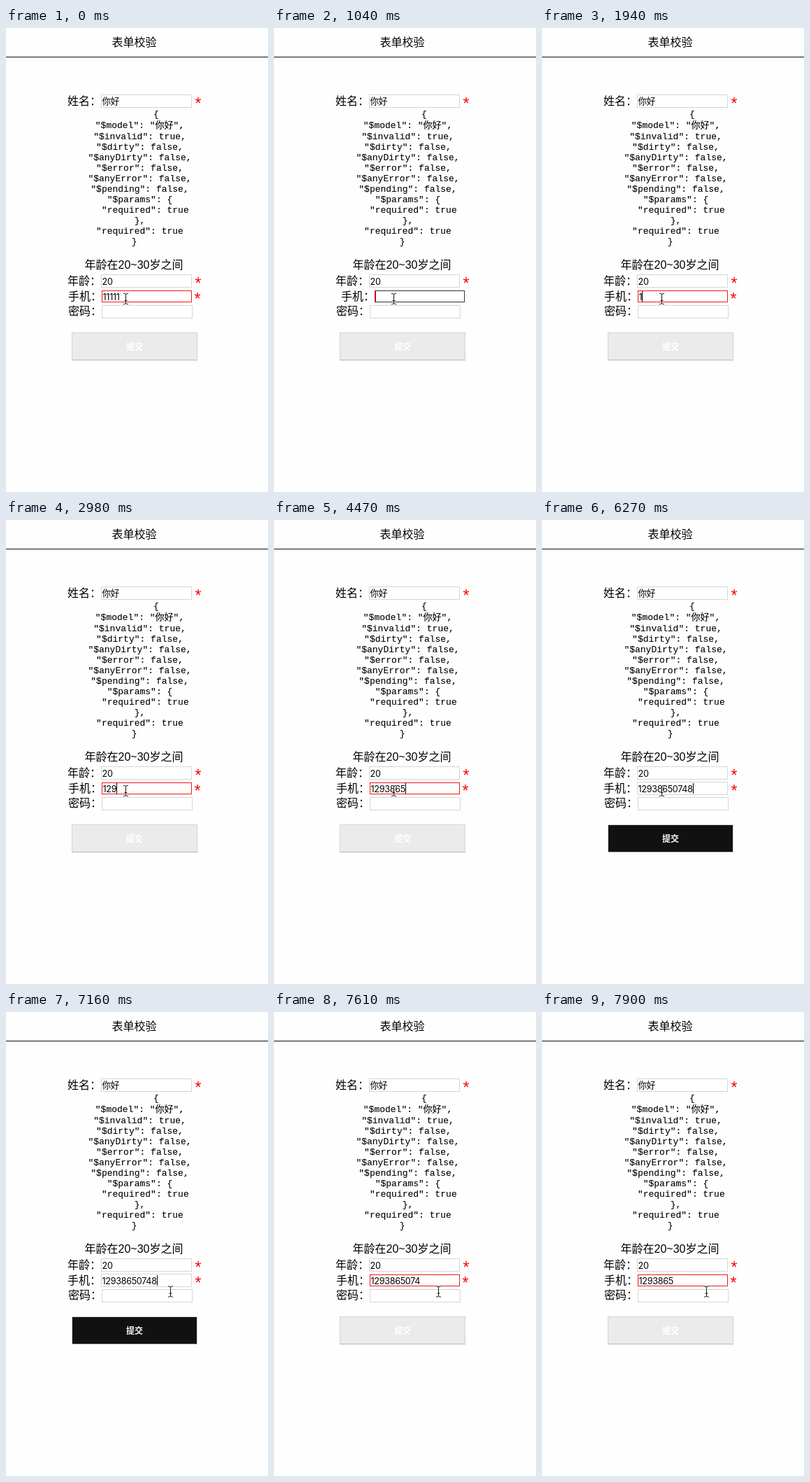
An HTML page for the animation above (8000 ms loop, 375 px wide and 663 px high).

```html
<!DOCTYPE html>
<html lang="zh-CN">
<head>
<meta charset="utf-8">
<title>表单校验</title>
<style>
  html, body { margin: 0; width: 100%; height: 100%; overflow: hidden; background: #fefefe; }
  svg { display: block; width: 375px; height: 663px; }
  text { font: 16px "Liberation Sans", "Noto Sans CJK SC", "Noto Sans CJK", sans-serif; white-space: pre; }
  .value { font: 12.6px Inter, "Noto Sans CJK SC", "Noto Sans CJK", sans-serif; letter-spacing: -.3px; }
  .code { font: 13px "Liberation Mono", "Noto Sans CJK SC", "Noto Sans CJK", monospace; text-anchor: middle; stroke: #000; stroke-width: .1px; }
  .star { font: 23px "Liberation Sans", sans-serif; fill: #f00; text-anchor: middle; }
  .submit { font: bold 12px "Noto Sans CJK SC", "Noto Sans CJK", sans-serif; fill: #fff; text-anchor: middle; }
  .field { fill: #fff; stroke: #d6d6d6; }
</style>
</head>
<body>
<svg viewBox="0 0 375 663">
  <rect width="375" height="663" fill="#fefefe"/>
  <text x="151.5" y="26">表单校验</text>
  <rect y="41" width="375" height="1" fill="#111"/>

  <g transform="translate(88 95)">
    <text y="14.5">姓名：</text>
    <rect class="field" x="48.5" y=".5" width="129" height="18"/>
    <text class="value" x="49.5" y="14">你好</text>
    <text class="star" x="187" y="20.5">*</text>
  </g>

  <g id="model"></g>

  <text x="112.5" y="344">年龄在20~30岁之间</text>
  <g transform="translate(88 352)">
    <text y="14.5">年龄：</text>
    <rect class="field" x="48.5" y=".5" width="129" height="18"/>
    <text class="value" x="49.5" y="14.5">20</text>
    <text class="star" x="187" y="20.5">*</text>
  </g>

  <g id="row">
    <text y="14.5">手机：</text>
    <rect id="plain" class="field" x="48.5" y=".5" width="129" height="18"/>
    <rect id="framed" x="48.5" y="1.5" width="128" height="16" fill="#fff"/>
    <path id="edge" d="M48.5 1V18" stroke="#e00"/>
    <rect id="mark" x="50" y="2" width="28" height="15" fill="#b4d5fe"/>
    <text id="phone" class="value" x="49.5" y="14.5"></text>
    <rect id="caret" y="2" width="1" height="15"/>
    <text id="star" class="star" x="186" y="20.5">*</text>
  </g>

  <g transform="translate(89 396)">
    <text y="14">密码：</text>
    <rect class="field" x="48.5" y=".5" width="129" height="18"/>
  </g>

  <rect id="button" x="94.5" y="435.5" width="179" height="39" stroke="#d4d4d4"/>
  <path d="M94 474.5H274" stroke="#b4b4b4"/>
  <text class="submit" x="184" y="460">提交</text>

  <defs>
    <path id="beam" d="M-3.5 -7.5H-2Q0 -7.5 0 -5.5V5.5Q0 7.5 -2 7.5H-3.5M3.5 -7.5H2Q0 -7.5 0 -5.5M0 5.5Q0 7.5 2 7.5H3.5M-2 2.5H2"/>
  </defs>
  <g id="pointer" fill="none">
    <use href="#beam" stroke="#fff" stroke-width="2.4" opacity=".7"/>
    <use href="#beam" stroke="#111"/>
  </g>
</svg>
<script>
const $ = id => document.getElementById(id);
const show = (id, yes) => $(id).setAttribute("visibility", yes ? "visible" : "hidden");
const set = (id, name, value) => $(id).setAttribute(name, value);

const LOOP = 8000;
const NUMBER = "12938650748";

// Time runs in ticks; the first one selects the old number.
const FIRST = 290, TICK = 149.2;
const CLEAR = 5, MOVE = 43.5, ERASE = 49;
const KEYS = [11, 16, 18, 22, 25, 27, 28, 31, 36, 37, 40];
const BLINK = 3;

const state = {
  $model: "你好",
  $invalid: true,
  $dirty: false,
  $anyDirty: false,
  $error: false,
  $anyError: false,
  $pending: false,
  $params: { required: true },
  required: true
};

// Centred lines: every leading space pushes a line right by half a character.
function printModel() {
  const lines = JSON.stringify(state, null, 2).split("\n");
  lines[0] = " ".repeat(8) + lines[0];
  lines.forEach((line, i) => {
    const body = line.trimStart();
    const row = document.createElementNS("http://www.w3.org/2000/svg", "text");
    row.setAttribute("class", "code");
    row.setAttribute("x", 183.7 + 3.9 * (line.length - body.length));
    row.setAttribute("y", 129 + 15 * i - 1.2 * Math.max(0, 2 - i));
    row.textContent = body;
    $("model").append(row);
  });
}

function phoneAt(n) {
  if (n < CLEAR) return "11111";
  const typed = KEYS.filter(k => k <= n).length;
  const erased = n < ERASE ? 0 : 2 ** (n - ERASE);
  return NUMBER.slice(0, typed - erased);
}

function caretAt(n) {
  if (n < CLEAR || n >= ERASE) return false;
  const last = Math.max(CLEAR, ...KEYS.filter(k => k <= n));
  return Math.floor((n - last) / BLINK) % 2 === 0;
}

function draw(t) {
  const n = Math.floor((t - FIRST) / TICK);
  const phone = phoneAt(n);
  const empty = phone === "";
  const valid = phone === NUMBER;

  $("phone").textContent = phone;
  show("mark", n >= 0 && n < CLEAR);
  show("caret", caretAt(n));
  set("caret", "x", empty ? 50 - 1 : Math.round(49.5 + $("phone").getComputedTextLength()));
  set("caret", "fill", empty ? "#a00" : "#000");

  set("row", "transform", `translate(${empty ? 96 : valid ? 88 : 89} 374)`);
  set("star", "x", valid ? 187 : 185);
  show("star", !empty);
  show("plain", valid);
  show("framed", !valid);
  set("framed", "stroke", empty ? "#333" : "#f01818");
  show("edge", empty);
  set("button", "fill", valid ? "#111" : "#ebebeb");

  const p = Math.min(1, Math.max(0, (n - MOVE) / 2));
  const ease = Math.sin(p * Math.PI / 2);
  set("pointer", "transform", `translate(${171.5 + 64 * ease} ${387 + 12.5 * ease})`);
}

printModel();
const begin = performance.now();
function tick() {
  draw((performance.now() - begin) % LOOP);
  requestAnimationFrame(tick);
}
tick();
</script>
</body>
</html>
```
